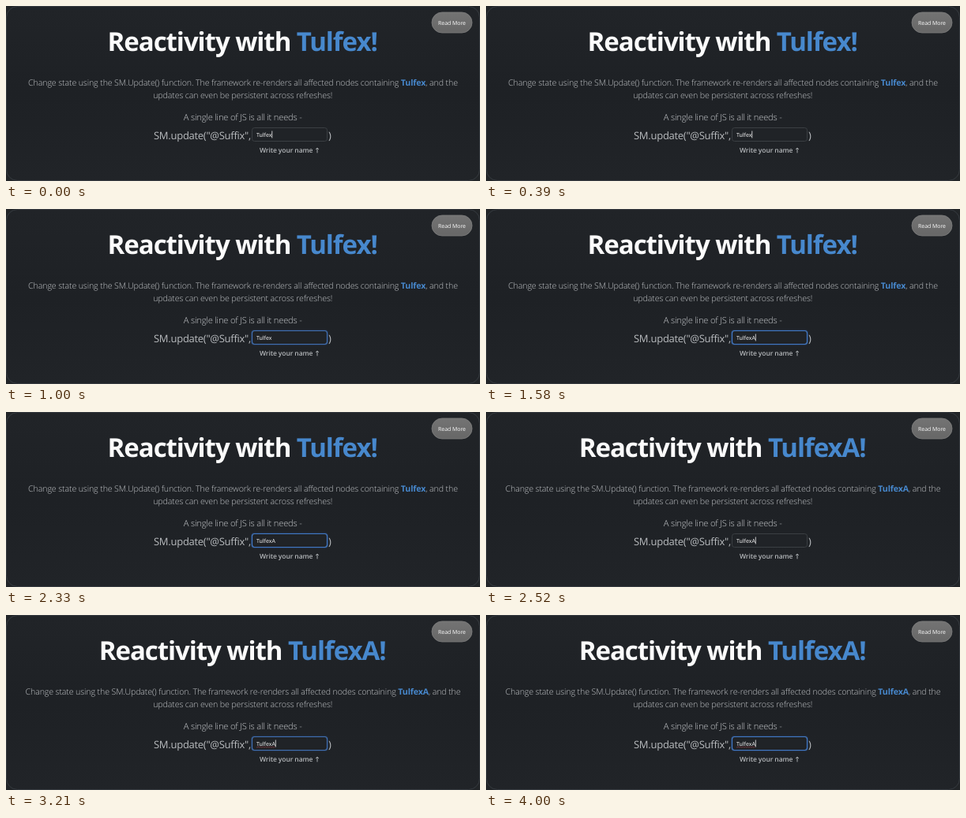
Animation of 600 by 222 pixels, one loop 4.36 s. Source, as an HTML page with a canvas:

```html
<!DOCTYPE html>
<html lang="en">
<head>
<meta charset="utf-8">
<title>Reactivity demo</title>
<style>
  html, body { margin: 0; width: 100%; height: 100%; overflow: hidden; background: #222528; }
  canvas { display: block; width: 600px; height: 222px; }
</style>
</head>
<body>
<canvas id="stage"></canvas>
<script>
const W = 600, H = 222, LOOP = 4360;
const FAMILY = '"Open Sans", "Noto Sans", sans-serif';
const BLUE = '#4788cd', BODY = '#c3c6c9';
const NAME = 'Tulfex';

const canvas = document.getElementById('stage');
const scale = window.devicePixelRatio || 1;
canvas.width = W * scale;
canvas.height = H * scale;
const ctx = canvas.getContext('2d');

const style = (weight, size, color, spacing = 0) => ({ weight, size, color, spacing });
const TITLE = style(700, 33, '#fbfbfb', -1.05);
const TITLE_NAME = { ...TITLE, color: BLUE };
const PARA = style(300, 10.65, BODY, -0.13);
const PARA_NAME = { ...PARA, weight: 700, color: BLUE };
const LEAD = style(300, 11.2, '#c8cbce', -0.21);
const CODE = style(400, 13, '#b9bcbf', -0.28);
const FIELD = style(400, 7, '#ffffff');
const HINT = style(600, 8.5, '#b3b6b9', -0.1);
const BUTTON = style(500, 6.9, '#ffffff');

function applyStyle(s) {
  ctx.font = `${s.weight} ${s.size}px ${FAMILY}`;
  ctx.letterSpacing = s.spacing + 'px';
  ctx.fillStyle = s.color;
}

function text(str, x, y, s) {
  applyStyle(s);
  ctx.fillText(str, x, y);
  return x + ctx.measureText(str).width;
}

// Centers a line made of [string, style] runs.
function centered(runs, cx, y) {
  let width = 0;
  for (const [str, s] of runs) {
    applyStyle(s);
    width += ctx.measureText(str).width;
  }
  let x = cx - width / 2;
  for (const [str, s] of runs) x = text(str, x, y, s);
}

function box(x, y, w, h, r, fill, stroke, lineWidth = 1) {
  ctx.beginPath();
  ctx.roundRect(x, y, w, h, r);
  if (fill) { ctx.fillStyle = fill; ctx.fill(); }
  if (stroke) { ctx.strokeStyle = stroke; ctx.lineWidth = lineWidth; ctx.stroke(); }
}

function vertical(y0, y1, ...colors) {
  const g = ctx.createLinearGradient(0, y0, 0, y1);
  colors.forEach((c, i) => g.addColorStop(i / (colors.length - 1), c));
  return g;
}

const within = (t, from, to) => t >= from && t < to;

function stateAt(t) {
  const ramp = (from, span, start) =>
    start + (1 - start) * Math.min(1, (t - from) / span);
  let focus = 0;
  if (within(t, 1000, 2520)) focus = ramp(1000, 30, 0.85);
  if (t >= 3210) focus = ramp(3210, 90, 0.85);
  return {
    typed: t >= 1580 ? NAME + 'A' : NAME,
    shown: t >= 2520 ? NAME + 'A' : NAME,
    caret: !within(t, 1000, 1270) && !within(t, 2330, 2520) && !within(t, 3850, 4000),
    misspelled: t >= 3210,
    focus
  };
}

function drawCard() {
  ctx.fillStyle = '#222528';
  ctx.fillRect(0, 0, W, H);
  box(0.5, 0.5, W - 1, H - 1, 14, vertical(0, H, '#212428', '#1e2125', '#212428'), '#363b40');
}

function drawButton() {
  box(539, 8, 51, 26, 13, vertical(8, 34, '#747474', '#676767'), '#7e7e7e', 0.8);
  centered([['Read More', BUTTON]], 564.5, 24.2);
}

function drawField({ typed, caret, misspelled, focus }) {
  if (focus) box(310.5, 153.5, 97, 19, 4, null, `rgba(52, 108, 190, ${0.2 * focus})`, 1.5);
  box(311.5, 154.5, 95, 17, 3, '#202327', '#3b3f43');
  if (focus) box(311.5, 154.5, 95, 17, 3, null, `rgba(66, 122, 200, ${focus})`, 1.2);

  const end = text(typed, 317, 165.7, FIELD);
  if (misspelled) {
    ctx.beginPath();
    for (let x = 317; x <= end; x += 0.5) ctx.lineTo(x, 167.6 + 0.5 * Math.sin(x * 2.1));
    ctx.strokeStyle = '#b8474b';
    ctx.lineWidth = 0.6;
    ctx.stroke();
  }
  if (caret) {
    ctx.fillStyle = '#ededed';
    ctx.fillRect(end, 158.5, 0.8, 9);
  }
}

function drawHint() {
  text('Write your name', 321, 186.2, HINT);
  ctx.beginPath();
  ctx.moveTo(394, 186.4);
  ctx.lineTo(394, 180);
  ctx.moveTo(392.2, 182);
  ctx.lineTo(394, 180);
  ctx.lineTo(395.8, 182);
  ctx.strokeStyle = HINT.color;
  ctx.lineWidth = 0.9;
  ctx.stroke();
}

function draw(t) {
  const state = stateAt(t);
  ctx.setTransform(scale, 0, 0, scale, 0, 0);
  ctx.textRendering = 'geometricPrecision';
  drawCard();
  drawButton();
  centered([['Reactivity with ', TITLE], [state.shown + '!', TITLE_NAME]], 299.2, 56.8);
  centered([
    ['Change state using the SM.Update() function. The framework re-renders all affected nodes containing ', PARA],
    [state.shown, PARA_NAME],
    [', and the', PARA]
  ], 300, 101);
  centered([['updates can even be persistent across refreshes!', PARA]], 299.7, 117.2);
  centered([['A single line of JS is all it needs -', LEAD]], 299.7, 145);
  text('SM.update("@Suffix",', 187, 169, CODE);
  text(')', 408, 169, CODE);
  drawField(state);
  drawHint();
}

function frame() {
  draw(performance.now() % LOOP);
  requestAnimationFrame(frame);
}
frame();
</script>
</body>
</html>
```
